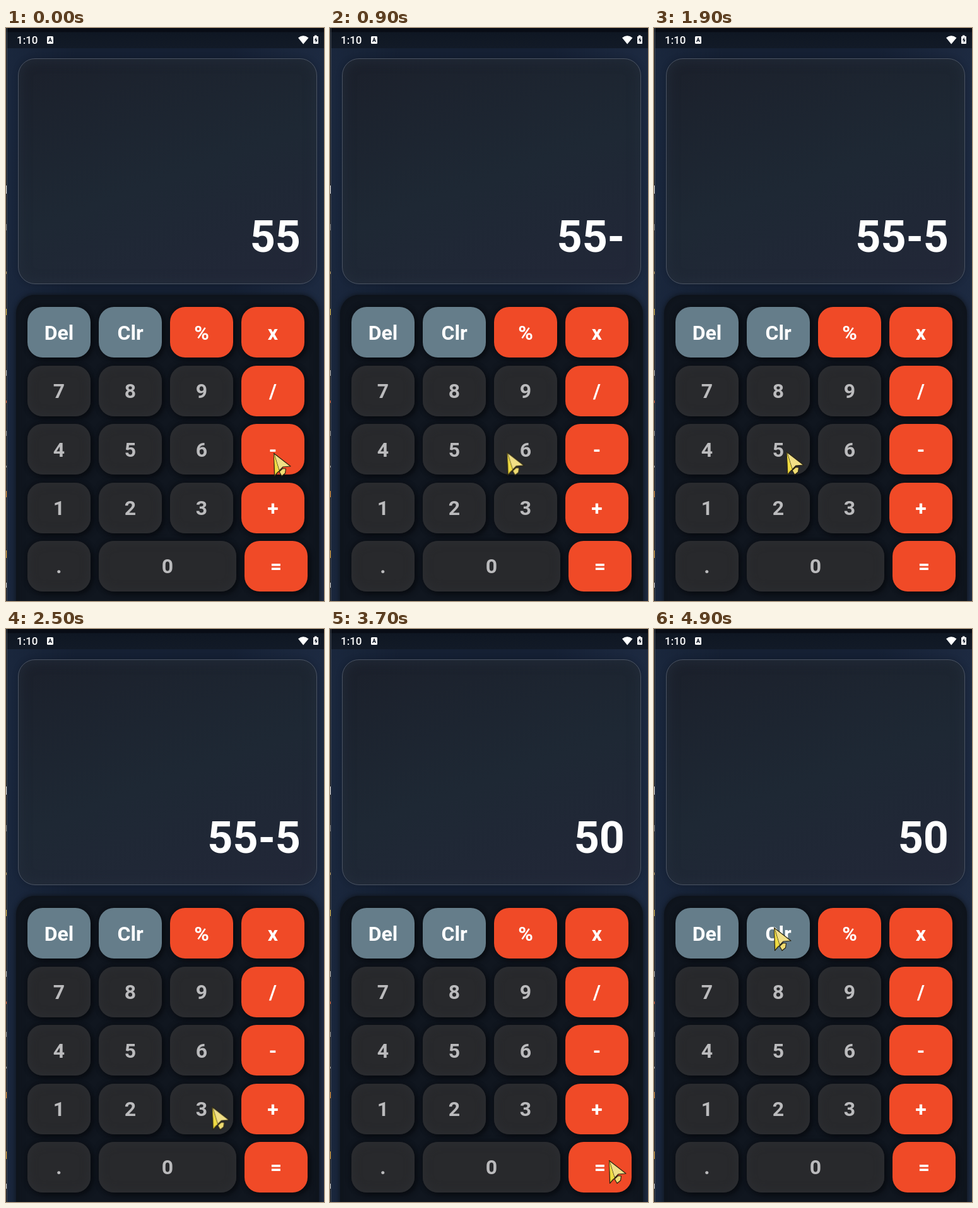
Animation, 504 px wide and 906 px high, one loop 5 s. Source, as an HTML page:

```html
<!DOCTYPE html>
<html lang="en">
<head>
<meta charset="utf-8">
<title>Calculator</title>
<style>
  html, body { margin: 0; width: 100%; height: 100%; overflow: hidden; }
  body {
    position: relative;
    font-family: Roboto, sans-serif;
    background: linear-gradient(90deg, #1a273d, #152033 22%, #152034 70%, #1d2a41);
  }
  body > *, .key { position: absolute; box-sizing: border-box; }

  .status { left: 0; top: 0; width: 504px; height: 32px;
    background: linear-gradient(#080c15 0 6px, #0f1723 7px, #121a27); }
  .clock { left: 17px; top: 9px; font: 500 17px/20px Roboto, sans-serif; color: #fff; }

  .screen {
    left: 19px; top: 48px; width: 474px; height: 357px;
    border: 1px solid #4b5463; border-radius: 27px;
    background: linear-gradient(160deg, #1b202b, #1e2834 52%, #222738);
    box-shadow: inset 0 0 16px 4px rgba(36, 47, 62, .6), 0 0 8px rgba(12, 18, 30, .35);
  }
  .value { right: auto; left: 60px; top: 290px; width: 407px; height: 80px; overflow: hidden; }
  .roll { font: 700 70px/80px Roboto, sans-serif; color: #fff; text-align: right;
    animation: roll 5s step-end infinite; }
  @keyframes roll {
    0% { transform: translateY(0); }
    4% { transform: translateY(-80px); }
    30% { transform: translateY(-160px); }
    68% { transform: translateY(-240px); }
  }

  .pad { left: 16px; top: 422px; width: 480px; height: 520px; border-radius: 30px;
    background: #10161f; box-shadow: 0 0 7px 1px #10161f, inset 0 0 14px #0d1219; }

  .key {
    height: 80px; padding-top: 1px; border-radius: 24px;
    display: flex; align-items: center; justify-content: center;
    font: 700 32px/38px Roboto, sans-serif; color: #fff;
    box-shadow: 4px 4px 9px #080b10, -2px -2px 7px rgba(12, 16, 22, .8);
  }
  .num { color: #bbbbbd; background: #28292c;
    box-shadow: inset 0 0 14px 2px #2c2e32, 4px 4px 9px #080b10, -2px -2px 7px rgba(12, 16, 22, .8); }
  .op { background: #f04a27; }
  .fn { background: #657d8a; }

  svg { left: 0; top: 0; overflow: visible; }
  .pointer { width: 30px; height: 40px; animation: move 5s linear infinite; }
  @keyframes move {
    0%, 12% { transform: translate(424px, 672px); animation-timing-function: ease-in-out; }
    22%, 42% { transform: translate(210px, 670px); animation-timing-function: ease-in-out; }
    58%, 80% { transform: translate(442px, 840px); animation-timing-function: ease-in; }
    86% { transform: translate(351px, 802px); animation-timing-function: ease-out; }
    97%, 100% { transform: translate(190px, 472px); }
  }
</style>
</head>
<body>
  <div class="status"></div>
  <div class="clock">1:10</div>
  <div class="screen"></div>
  <div class="value"><div class="roll">55<br>55-<br>55-5<br>50</div></div>
  <div class="pad"></div>
  <div id="keys" style="left:0;top:0"></div>

  <svg width="504" height="906">
    <rect x="65" y="13" width="10" height="12" rx="1.5" fill="#fff"/>
    <path d="M67.5 22 70 16 72.5 22M68.5 20h3" fill="none" stroke="#111927" stroke-width="1.3"/>
    <path d="M463 15.5Q471 9 479.500 15.500L471.200 25.500Z" fill="#fff"/>
    <path d="M489 11.500h3.500v1.500H494q1 0 1 1V24q0 1-1 1h-6q-1 0-1-1V14q0-1 1-1h1Z" fill="#fff"/>
    <path d="M491.800 14.500l-3 5h2v4l3-5h-2Z" fill="#111927"/>
    <rect y="32" width="1" height="874" fill="#17191f"/>
    <rect x="1" width="1" height="906" fill="#454a52"/>
    <g id="edge"></g>
  </svg>

  <svg class="pointer" stroke="#292414" stroke-width="1.2" stroke-linejoin="round">
    <path d="M.5.5 1.500 36.500 9 28 15 21Z" fill="#dcc52f"/>
    <path d="M.5.5 27 21 15 22 9 28Z" fill="#f1df86"/>
    <path d="M.5.5 9 28 3 31Z" fill="#f0dc45" stroke="none"/>
    <path d="M9 29.500 14.500 24.500 19.500 25 18.500 32 13 36.500Z" fill="#f0dc72"/>
  </svg>

<script>
  const rows = [
    ["Del", "Clr", "%", "x"],
    ["7", "8", "9", "/"],
    ["4", "5", "6", "-"],
    ["1", "2", "3", "+"],
    [".", "0", "="]
  ];
  const keys = document.getElementById("keys");

  function kind(label) {
    if (label.length > 1) return "fn";
    return /[\d.]/.test(label) ? "num" : "op";
  }

  rows.forEach((row, r) => {
    let x = 34;
    row.forEach(label => {
      const width = label === "0" ? 218 : 100;
      const key = document.createElement("div");
      key.className = "key " + kind(label);
      key.textContent = label;
      key.style.cssText = `left:${x}px;top:${441.3 + r * 92.4}px;width:${width}px`;
      keys.append(key);
      x += width + 13;
    });
  });

  // Slivers of the window behind the left edge: y, height, colour
  const bits = [
    [249, 13, "#ddd"], [310, 10, "#777"], [385, 4, "#a98b50"],
    [444, 10, "#d5b13c"], [541, 9, "#aaa"], [589, 4, "#d9552d"],
    [637, 8, "#888"], [692, 3, "#999"], [732, 10, "#e08a2c"],
    [826, 12, "#dda032"], [877, 8, "#ccc"]
  ];
  document.getElementById("edge").innerHTML = bits.map(([y, h, c]) =>
    `<rect y="${y}" width="1" height="${h}" fill="${c}"/>`).join("");
</script>
</body>
</html>
```
